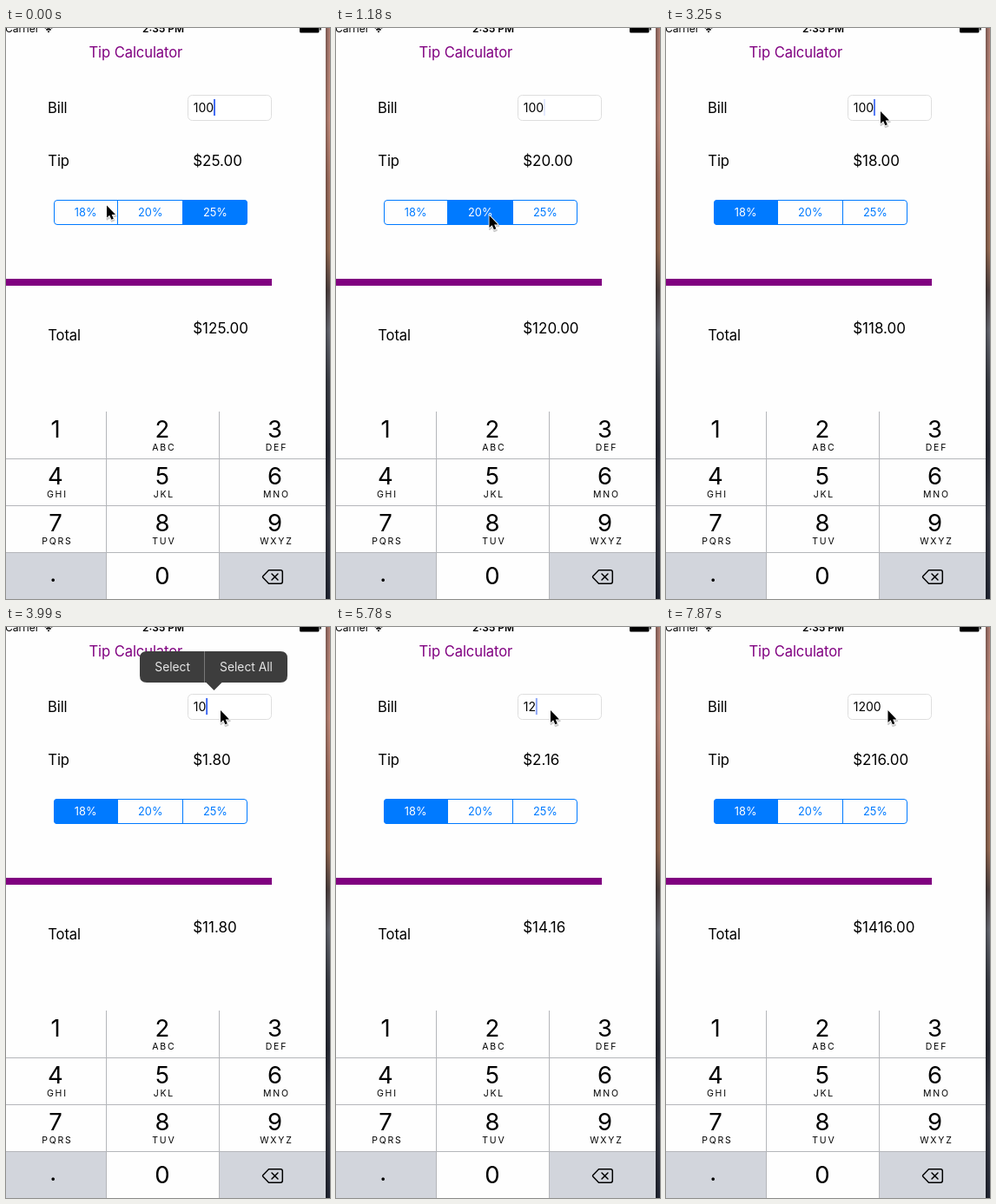
An HTML page for the animation above (8 s loop, 373x658 px).

```html
<!DOCTYPE html>
<html lang="en">
<head>
<meta charset="utf-8">
<title>Tip Calculator</title>
<style>
  html, body { margin: 0; width: 100%; height: 100%; overflow: hidden; background: #fefefe; }
  svg { display: block; width: 373px; height: 658px; }
  text { font-family: Inter, Roboto, sans-serif; font-size: 17px; fill: #000; }
  .mid { text-anchor: middle; }
  .label { font-size: 16.6px; letter-spacing: -.1px; }
  .title { fill: #800080; }
  .status { font-size: 12px; }
  .digit { font-size: 27.5px; }
  .letters { font-size: 10.5px; letter-spacing: 1.8px; }
  .tab { font-size: 12.8px; fill: #007aff; }
  .tab.on { fill: #fff; }
  .menu text { font-size: 13.8px; fill: #e6e6e6; }
  #bill { font-size: 14px; }
</style>
</head>
<body>
<svg viewBox="0 0 373 658">
  <defs>
    <linearGradient id="wall" x2="0" y2="1">
      <stop offset="0" stop-color="#c08a7e"/>
      <stop offset=".16" stop-color="#d79a88"/>
      <stop offset=".27" stop-color="#b57d6b"/>
      <stop offset=".39" stop-color="#a8785e"/>
      <stop offset=".46" stop-color="#5a4a49"/>
      <stop offset=".53" stop-color="#747680"/>
      <stop offset=".62" stop-color="#434650"/>
      <stop offset=".74" stop-color="#2c2f3b"/>
      <stop offset=".86" stop-color="#444753"/>
      <stop offset="1" stop-color="#252a3a"/>
    </linearGradient>
    <linearGradient id="shade">
      <stop offset="0" stop-opacity=".4"/>
      <stop offset="1" stop-opacity=".05"/>
    </linearGradient>
    <clipPath id="tabsClip"><rect x="55" y="198" width="223" height="29" rx="4"/></clipPath>
  </defs>

  <rect width="373" height="658" fill="#fefefe"/>

  <text class="status" x="-1" y="5.3">Carrier</text>
  <g fill="none" stroke="#000" stroke-width="1.7">
    <path d="M44.6 .2Q49 -3.6 53.4 .2M46.4 2.3Q49 .2 51.6 2.3"/>
    <path d="M49 5.4L47.6 3.8Q49 2.8 50.4 3.8Z" fill="#000" stroke="none"/>
  </g>
  <text class="status mid" x="181" y="5.3" font-weight="600">2:35 PM</text>
  <rect x="338" y="-4" width="22.5" height="9.5" rx="1.5"/>
  <rect x="361.3" y="-1" width="1.4" height="3.5"/>

  <text class="label title" x="95.5" y="34">Tip Calculator</text>
  <text class="label" x="48" y="98.3">Bill</text>
  <text class="label" x="48.3" y="158.5">Tip</text>
  <text class="label" x="48.3" y="359.5">Total</text>
  <text id="tip" x="215.2" y="158.5"></text>
  <text id="total" x="215.2" y="351.5"></text>

  <rect x="209.5" y="77.5" width="96" height="29" rx="5" fill="#fff" stroke="#dedede"/>
  <text id="bill" x="215.8" y="97"></text>
  <rect id="caret" y="82" width="2" height="19" fill="#426bf2"/>

  <g id="tabs" clip-path="url(#tabsClip)"></g>
  <path d="M128.5 198V227M203.5 198V227" stroke="#007aff"/>
  <rect x="55.5" y="198.5" width="222" height="28" rx="3.5" fill="none" stroke="#007aff"/>
  <g id="tabLabels"></g>

  <rect y="289" width="306" height="8" fill="#800080"/>

  <path d="M0 604H115V658H0ZM246 604H368V658H246Z" fill="#d2d5dc"/>
  <path d="M0 496.5H368M0 550.5H368M0 604.5H368M115.5 442V658M245.5 442V658" stroke="#b4b6ba"/>
  <g id="keys"></g>
  <g fill="none" stroke="#000" stroke-width="1.5" stroke-linejoin="round" stroke-linecap="round">
    <path d="M302.5 624.8H316Q318.3 624.8 318.3 627V638Q318.3 640.2 316 640.2H302.5L295.8 633.3Q295.2 632.5 295.8 631.7Z"/>
    <path d="M306 629L313 636M313 629L306 636"/>
  </g>

  <g id="menu" class="menu">
    <path d="M162 28H316Q324 28 324 36V56Q324 64 316 64H248.5L239.5 73L230.5 64H162Q154 64 154 56V36Q154 28 162 28Z" fill="#3d3d3d"/>
    <path d="M228.5 28V64" stroke="#777"/>
    <text class="mid" x="191.7" y="51">Select</text>
    <text class="mid" x="276.5" y="51">Select All</text>
  </g>

  <rect x="368" width="5" height="658" fill="url(#wall)"/>
  <rect x="368" width="5" height="658" fill="url(#shade)"/>

  <g id="pointer" stroke-linejoin="round">
    <path d="M.5 1V15L3.7 12.2L5.8 17.2L8.4 16.1L6.3 11.3H10.7Z" opacity=".2" transform="translate(0 1)" stroke="#000" stroke-width="2"/>
    <path d="M0 0V14L3.2 11.2L5.4 16.3L7.8 15.3L5.7 10.4H10Z" stroke="#fff" stroke-width="1.6" paint-order="stroke"/>
  </g>
</svg>
<script>
const LOOP = 8000, TICK = 148;
const $ = id => document.getElementById(id);
const svgNode = (parent, tag, attrs, text = '') => {
  const node = document.createElementNS('http://www.w3.org/2000/svg', tag);
  for (const key in attrs) node.setAttribute(key, attrs[key]);
  node.textContent = text;
  return parent.appendChild(node);
};

const RATES = [18, 20, 25];
const edges = [55, 128, 203, 278];
const tabs = RATES.map((rate, i) => ({
  rate,
  box: svgNode($('tabs'), 'rect', { x: edges[i], y: 198, width: edges[i + 1] - edges[i], height: 29 }),
  label: svgNode($('tabLabels'), 'text', { x: 91.7 + i * 74.6, y: 217, class: 'tab mid' }, rate + '%')
}));

const columns = [57, 180, 309.5];
['', 'ABC', 'DEF', 'GHI', 'JKL', 'MNO', 'PQRS', 'TUV', 'WXYZ'].forEach((letters, i) => {
  const x = columns[i % 3], y = 472 + Math.floor(i / 3) * 54;
  svgNode($('keys'), 'text', { x, y, class: 'digit mid' }, i + 1);
  svgNode($('keys'), 'text', { x: x + 1.9, y: y + 15, class: 'letters mid' }, letters);
});
svgNode($('keys'), 'text', { x: 180, y: 641, class: 'digit mid' }, '0');
svgNode($('keys'), 'text', { x: 54.3, y: 638, class: 'digit mid' }, '.');

// Each track holds [start time, value] steps.
const bills = [[0, '100'], [3840, '10'], [4130, '1'], [4430, ''], [4880, '1'], [5330, '12'], [6820, '120'], [6970, '1200']];
const rates = [[0, 25], [730, 20], [2360, 18]];
const presses = [[0, 0], [590, 20], [730, 0], [2070, 18], [2360, 0]];
const menus = [[0, 0], [3690, 1], [4130, 0]];
const carets = [[0, 1], [150, .35], [290, 0], [590, .5], [730, 1], [1180, .15], [1330, 0], [1630, 1],
  [2070, .3], [2220, 0], [2660, 1], [2960, 0], [3100, .4], [3250, .9], [3690, 1],
  [5780, .6], [5920, 0], [6220, .5], [6370, 1], [7570, .4], [7720, 0]];
// Pointer moves: start, end, from, to.
const moves = [
  [0, 290, [116, 204.5], [176.5, 216]],
  [1180, 1624, [176.5, 216], [93.5, 217]],
  [2360, 3100, [93.5, 217], [247, 96]],
  [7420, 7860, [247, 96], [255.5, 96]]
];

const at = (track, t) => track.findLast(step => step[0] <= t)[1];
const ease = p => p * p * (3 - 2 * p);
const money = n => '$' + n.toFixed(2);

function pointerAt(t) {
  const [start, end, from, to] = moves.findLast(move => move[0] <= t);
  const p = ease(Math.min(1, (t - start) / (end - start)));
  return from.map((v, i) => v + (to[i] - v) * p);
}

function draw(t) {
  const bill = at(bills, t), rate = at(rates, t), pressed = at(presses, t);
  const tip = bill * rate / 100;
  $('bill').textContent = bill;
  $('tip').textContent = money(tip);
  $('total').textContent = money(+bill + tip);
  $('caret').setAttribute('x', 216 + (bill ? $('bill').getComputedTextLength() - .4 : 0));
  $('caret').setAttribute('opacity', at(carets, t));
  $('menu').setAttribute('opacity', at(menus, t));
  for (const tab of tabs) {
    const on = tab.rate === rate;
    tab.box.setAttribute('fill', on ? '#007aff' : tab.rate === pressed ? '#d9ebff' : '#fefefe');
    tab.label.classList.toggle('on', on);
  }
  const tick = Math.floor((t + 6) / TICK) * TICK;
  $('pointer').setAttribute('transform', `translate(${pointerAt(tick)})`);
}

const origin = performance.now();
function frame() {
  draw((performance.now() - origin) % LOOP);
  requestAnimationFrame(frame);
}
frame();
</script>
</body>
</html>
```
